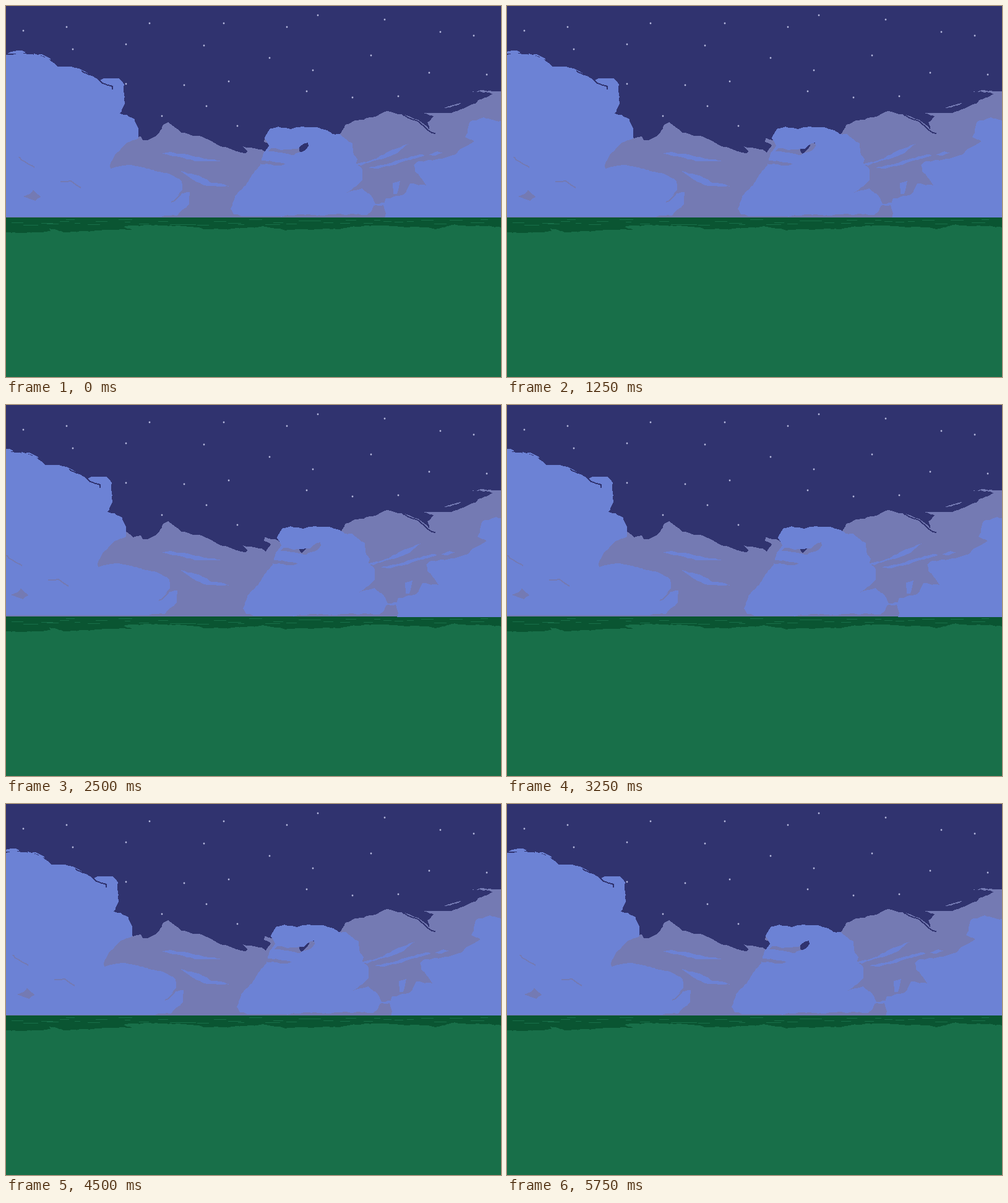
An HTML page for the animation above (6 s loop, 800 px wide and 600 px high).

```html
<!DOCTYPE html>
<html lang="en">
<head>
<meta charset="utf-8">
<title>Night clouds</title>
<style>
  html, body { margin: 0; width: 100%; height: 100%; overflow: hidden; background: #30336f; }
  svg { display: block; width: 800px; height: 600px; shape-rendering: crispEdges; }
  path { fill: var(--ink); }
  .line { fill: none; stroke: var(--ink); stroke-width: 2; }
  .sky { --ink: #30336f; }
  .haze { --ink: #747ab3; }
  .cloud { --ink: #6c82d5; }
  .grass { --ink: #186f49; }
  .dark { --ink: #0a5532; }
  .star { fill: #b4b7dc; shape-rendering: auto; }

  #west { --far: -22px; animation: drift 6s infinite, rise 6s step-end infinite; }
  #east { --far: 22px; animation: drift 6s infinite, sink 6s step-end infinite; }
  @keyframes drift {
    0%, 100% { translate: 0 0; animation-timing-function: steps(12, jump-none); }
    50% { translate: var(--far) 0; animation-timing-function: steps(12, jump-none); }
  }
  @keyframes rise {
    0%, 70.833% { transform: none; }
    29.166% { transform: translateY(-1px); }
  }
  @keyframes sink {
    0%, 66.666% { transform: none; }
    33.333% { transform: translateY(1px); }
  }
</style>
</head>
<body>
<svg viewBox="0 0 800 600">
  <g id="back"></g>
  <g id="ground"></g>
  <g id="west"></g>
  <g id="east"></g>
</svg>
<script>
  let seed = 7;
  const rand = () => (seed = seed * 16807 % 2147483647) / 2147483647;

  const add = (layer, tag, cls, attrs) => {
    const el = document.createElementNS('http://www.w3.org/2000/svg', tag);
    el.setAttribute('class', cls);
    for (const key in attrs) el.setAttribute(key, attrs[key]);
    document.getElementById(layer).append(el);
  };

  // Splits long slanted edges and nudges the new points for a ragged outline.
  const rough = (a, b) => {
    const [dx, dy] = [b[0] - a[0], b[1] - a[1]];
    const len = Math.hypot(dx, dy);
    if (len < 7 || !dx || !dy) return [b];
    const k = (rand() - .5) * Math.min(.2, 2.5 / len);
    const mid = [(a[0] + b[0]) / 2 - dy * k, (a[1] + b[1]) / 2 + dx * k];
    return [...rough(a, mid), ...rough(mid, b)];
  };

  const trace = text => {
    const n = text.trim().split(/\s+/).map(Number);
    const pts = [];
    for (let i = 0; i < n.length; i += 2) pts.push([n[i], n[i + 1]]);
    const out = [pts[0]];
    for (let i = 1; i < pts.length; i++) out.push(...rough(pts[i - 1], pts[i]));
    return 'M' + out.map(p => p.map(v => v.toFixed(1))).join('L');
  };

  const shape = (layer, cls, ...rings) =>
    add(layer, 'path', cls, { d: rings.map(r => trace(r) + 'Z').join(''), 'fill-rule': 'evenodd' });
  const line = (layer, cls, text) => add(layer, 'path', 'line ' + cls, { d: trace(text) });

  // Stars
  const stars = `28 40 98 34 108 70 194 62 232 28 320 64 352 28 454 34 504 15 612 22 702 42 756 48 777 111
    684 108 634 146 560 148 590 80 496 104 486 138 426 84 360 122 288 128 324 162 374 194 252 178 194 126`;
  for (const [, cx, cy] of stars.matchAll(/(\d+)\s+(\d+)/g)) add('back', 'circle', 'star', { cx, cy, r: 1.4 });

  // Still haze
  shape('back', 'haze', `0 342 0 200 170 190 190 203 206 214 218 211 221 217 229 217 247 206 254 192 262 188
    284 205 312 210 345 226 387 238 390 235 383 227 413 232 420 237 428 225 417 220 418 214 445 222 500 222 500 342`);
  shape('back', 'haze', `499 342 499 222 538 208 548 192 560 187 597 179 615 170 640 175 666 184 684 200 681 188
    692 178 667 173 720 173 759 158 763 152 790 142 752 139 770 136 800 138 800 342`);
  shape('back', 'haze', '708 165 722 160 736 157 718 164');
  line('back', 'sky', '640 174 668 188 685 203 694 206');
  shape('back', 'sky', '473 210 490 210 490 226 478 240 474 234');
  shape('back', 'cloud', '251 238 265 236 303 243 320 247 354 251 305 251 270 243');
  shape('back', 'cloud', '282 267 306 273 330 285 361 292 325 291 302 281');

  // Ground
  add('ground', 'path', 'grass', { d: 'M0 342H800V600H0Z' });
  shape('ground', 'dark', `0 342 800 342 800 358 720 354 690 360 610 355 525 361 452 363 420 357 345 361 230 354
    190 357 204 362 102 366 70 360 72 364 0 366`);
  for (let x = 0; x < 790; x += 12 + rand() * 16) {
    const y = 345 + Math.floor(rand() * 10);
    add('ground', 'path', 'grass', { d: `M${x} ${y}h${10 + rand() * 26}v1h-${6 + rand() * 12}z` });
  }

  // Left bank
  shape('west', 'cloud', `0 341 0 79 18 77 42 78 68 84 84 98 106 98 128 106 152 120 158 117 182 117 191 127
    192 158 184 174 195 176 208 183 214 198 214 214 195 221 178 238 168 258 169 263 202 257 260 270
    284 284 285 297 278 306 297 301 296 320 277 339 250 341`);
  shape('west', 'cloud', '2 77 14 73 26 72 32 75 20 77');
  line('west', 'cloud', '45 78 57 79 72 86');
  line('west', 'sky', '122 105 140 112 156 125 172 130 172 135');
  shape('west', 'haze', '28 308 39 304 44 297 56 309 47 315');
  line('west', 'haze', '21 244 31 252 46 261');
  line('west', 'haze', '88 284 105 283 121 294');
  line('west', 'haze', '267 317 275 312 283 304');

  // Middle and right banks
  shape('east', 'cloud', `420 233 425 226 418 214 428 198 440 195 460 199 480 195 515 200 532 208 540 207
    560 222 562 240 568 248 566 254 575 262 576 281 549 303 575 295 588 304 596 318 590 333 583 338
    510 339 480 337 440 340 380 340 368 337 363 328 370 308 392 283 410 259 416 237`,
    '428 230 445 233 472 231 478 225 488 221 489 226 484 233 465 241 424 235');
  shape('east', 'haze', '411 250 452 255 440 258 412 256');
  shape('east', 'cloud', '566 256 598 247 632 230 653 222 632 238 600 249 574 258');
  shape('east', 'cloud', '586 262 630 250 668 240 677 242 640 252 602 263');
  shape('east', 'cloud', '682 240 697 235 706 237 690 242');
  shape('east', 'cloud', `800 342 800 186 772 180 750 187 746 205 742 212 757 219 733 232 727 240 705 247
    664 252 659 257 661 268 680 290 653 287 644 304 613 312 612 318 594 319 594 323 610 322 614 335 612 342`);
  shape('east', 'cloud', '625 286 637 283 632 304 626 304');
</script>
</body>
</html>
```
